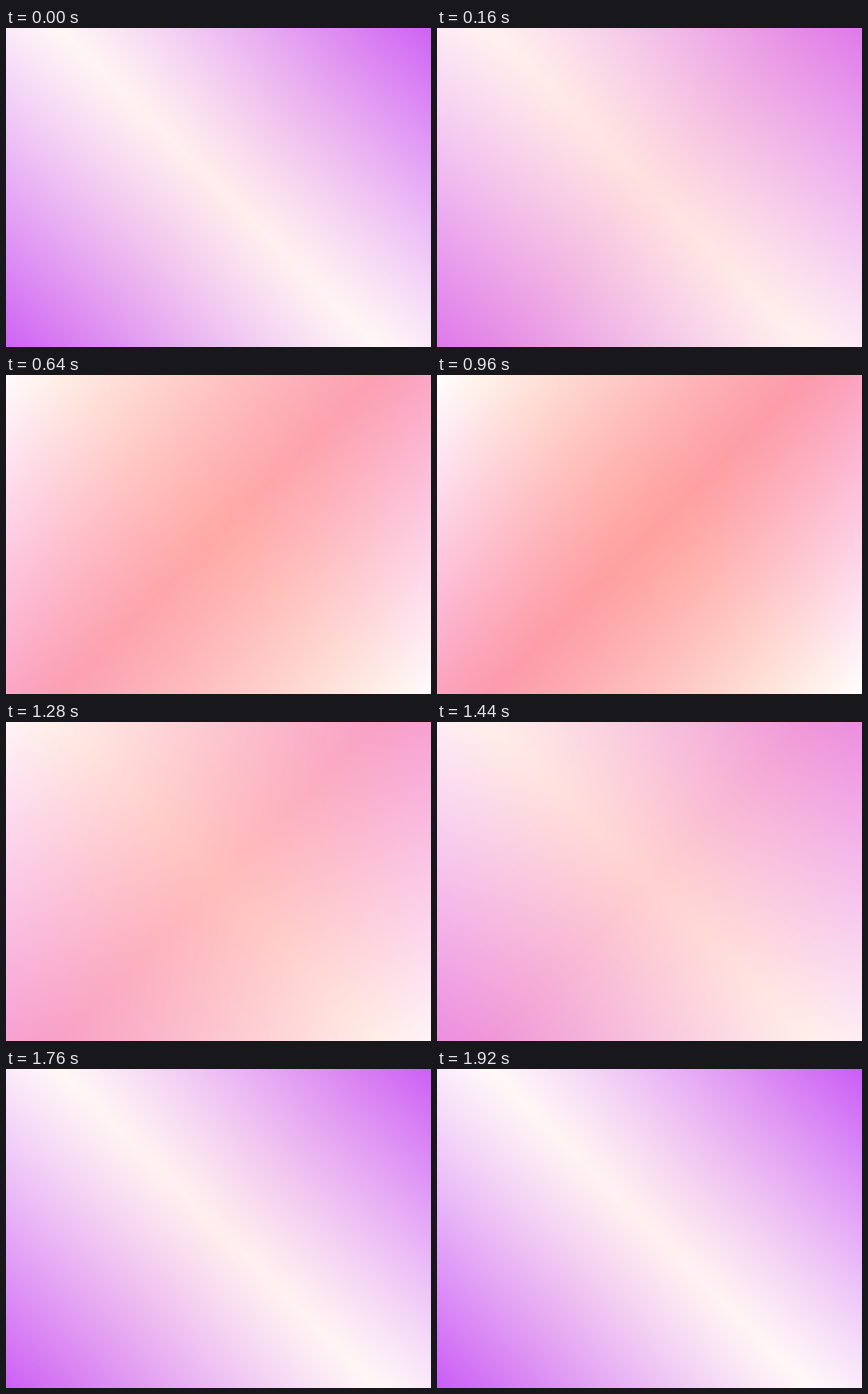
Animation of 500x375 px, one loop 2 s. Source, as an HTML page with a canvas:

```html
<!DOCTYPE html>
<html lang="en">
<head>
<meta charset="utf-8">
<title>Pastel sheen</title>
<style>
  html, body { margin: 0; width: 100%; height: 100%; overflow: hidden; }
  canvas { display: block; width: 100%; height: 100%; }
</style>
</head>
<body>
<canvas id="stage" width="500" height="375"></canvas>
<script>
const W = 500, H = 375, LOOP = 2000, STEP = 80;
const COOLEST = 1865; // time of the white and purple extreme
const ctx = document.getElementById('stage').getContext('2d');
const image = ctx.createImageData(W, H);

// Softened distance from a diagonal, 1 at the far corner.
const bend = d => Math.pow(Math.abs(d) * 2 / (W + H), 1.17);

// Two crossed folds: "v" grows along the \ diagonal, "u" along the / one.
const field = [];
for (let y = 0; y < H; y++) {
  for (let x = 0; x < W; x++) {
    const dx = x + 0.5 - W / 2, dy = y + 0.5 - H / 2;
    const side = (2 * dx / W) ** 2 - (2 * dy / H) ** 2;
    field.push({ v: bend(dx + dy), u: bend(dx - dy), side });
  }
}

function draw(t) {
  // The sheen swings between cool (purple sides) and warm (salmon band).
  const cool = (1 + Math.cos(2 * Math.PI * (t - COOLEST) / LOOP)) / 2;
  const warm = 1 - cool;
  const lift = 10 + 86 * warm ** 1.3;
  const redFall = 4 + 50 * cool ** 2.5;
  const greenFall = 8 + 142 * cool ** 1.7;
  const blueRise = 6 + 18 * warm;

  const px = image.data;
  let o = 0;
  for (const { v, u, side } of field) {
    px[o++] = 255 - redFall * u;
    px[o++] = 240 - 80 * warm + lift * v - greenFall * u;
    px[o++] = 240 - 84 * warm + lift * v + blueRise * u + 10 * warm * side;
    px[o++] = 255;
  }
  ctx.putImageData(image, 0, 0);
}

const start = performance.now();
let shown = -1;
function tick() {
  const t = Math.floor((performance.now() - start) % LOOP / STEP) * STEP;
  if (t !== shown) draw(shown = t);
  requestAnimationFrame(tick);
}
tick();
</script>
</body>
</html>
```
